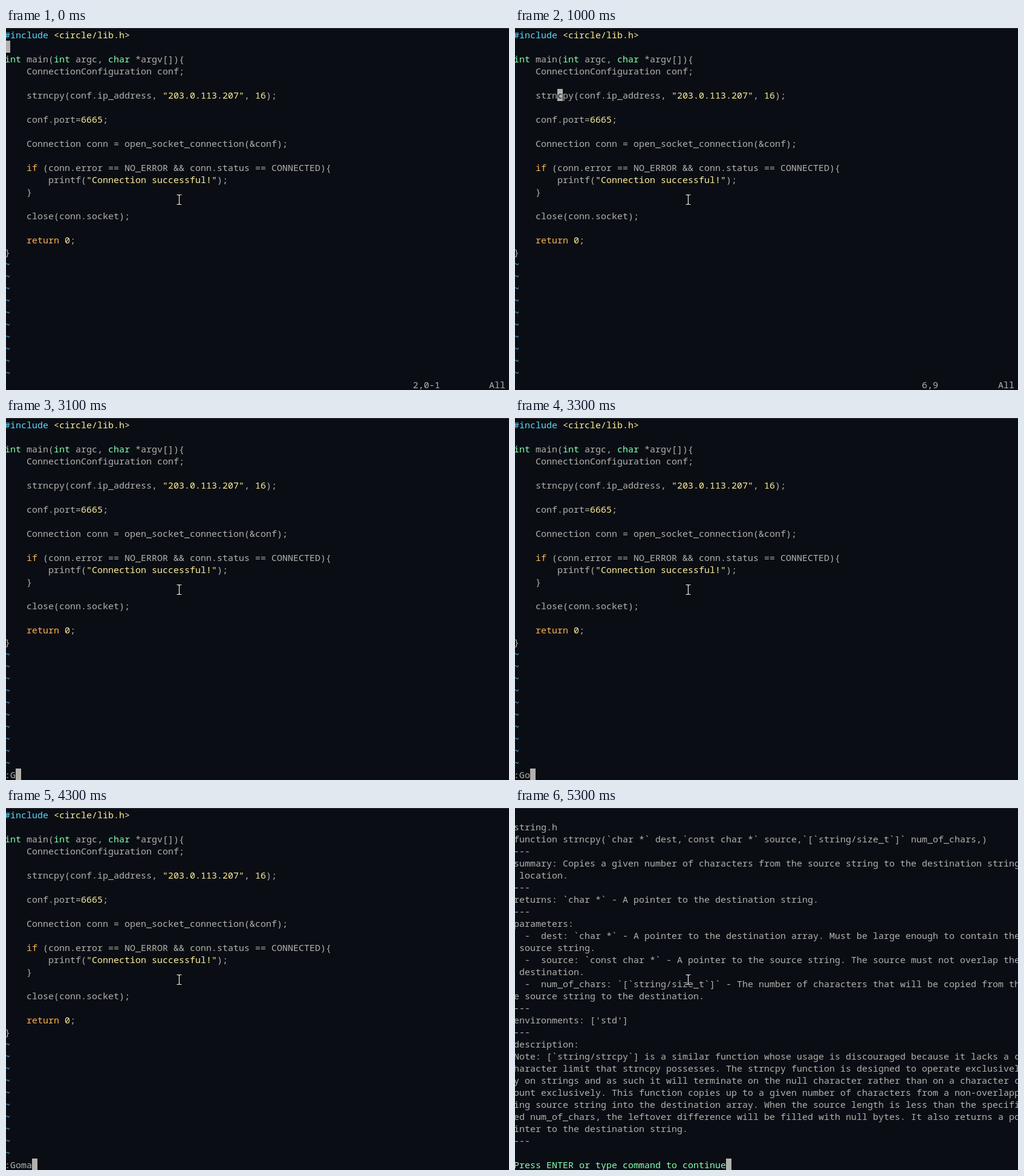
These frames come from a looping animation (832x600 px, 8 s). An HTML page:

```html
<!DOCTYPE html>
<html lang="en">
<head>
<meta charset="utf-8">
<title>Editor lookup</title>
<style>
  html, body { margin: 0; width: 100%; height: 100%; overflow: hidden; background: #0a0e14; }
  #stage { position: relative; width: 832px; height: 600px; overflow: hidden; background: #0a0e14; color: #b3b1ad; }
  #stage::before { content: ""; position: absolute; inset: 0 0 auto; height: 1px; background: #2d3136; }
  pre, #cursor {
    position: absolute; left: -2px; top: 1px; margin: 0;
    font: 15px/20px "Roboto Mono", "Noto Sans Mono", monospace;
    font-variant-ligatures: none; white-space: pre;
  }
  #cursor { width: 9px; height: 20px; background: #b3b1ad; color: #0a0e14; }
  #bottom { top: 581px; }
  #doc { visibility: hidden; }
  .pre { color: #5fd7ff; }
  .type { color: #87ffaf; }
  .lit { color: #ffee99; }
  .key { color: #ffb454; }
  .fill { color: #59c2ff; }
  #mouse { position: absolute; left: 280px; top: 274px; }

  #code { animation: code 8s step-end infinite; }
  #doc { animation: doc 8s step-end infinite; }
  @keyframes code { 0% { visibility: visible } 66.25%, 100% { visibility: hidden } }
  @keyframes doc { 0% { visibility: hidden } 66.25%, 100% { visibility: visible } }
</style>
</head>
<body>
<div id="stage">
<pre id="code"><span class="pre">#include </span><span class="lit">&lt;circle/lib.h&gt;</span>

<span class="type">int</span> main(<span class="type">int</span> argc, <span class="type">char</span> *argv[]){
    ConnectionConfiguration conf;

    strncpy(conf.ip_address, <span class="lit">"203.0.113.207"</span>, <span class="lit">16</span>);

    conf.port=<span class="lit">6665</span>;

    Connection conn = open_socket_connection(&amp;conf);

    <span class="key">if</span> (conn.error == NO_ERROR &amp;&amp; conn.status == CONNECTED){
        printf(<span class="lit">"Connection successful!"</span>);
    }

    close(conn.socket);

    <span class="key">return</span> <span class="lit">0</span>;
}
<span class="fill">~
~
~
~
~
~
~
~
~
~</span></pre>
<pre id="doc">

string.h
function strncpy(`char *` dest,`const char *` source,`[`string/size_t`]` num_of_chars,)
---
summary: Copies a given number of characters from the source string to the destination string
 location.
---
returns: `char *` - A pointer to the destination string.
---
parameters:
  -  dest: `char *` - A pointer to the destination array. Must be large enough to contain the
 source string.
  -  source: `const char *` - A pointer to the source string. The source must not overlap the
 destination.
  -  num_of_chars: `[`string/size_t`]` - The number of characters that will be copied from th
e source string to the destination.
---
environments: ['std']
---
description:
Note: [`string/strcpy`] is a similar function whose usage is discouraged because it lacks a c
haracter limit that strncpy possesses. The strncpy function is designed to operate exclusivel
y on strings and as such it will terminate on the null character rather than on a character c
ount exclusively. This function copies up to a given number of characters from a non-overlapp
ing source string into the destination array. When the source length is less than the specifi
ed num_of_chars, the leftover difference will be filled with null bytes. It also returns a po
inter to the destination string.
---</pre>
<pre id="bottom"></pre>
<div id="cursor"></div>
<svg id="mouse" width="14" height="21" viewBox="0 0 14 21" fill="none">
  <path id="beam" d="M2.5 2.5H5.5L6.5 3.5L7.5 2.5H10.5M6.5 3.5V17.5M2.5 18.5H5.5L6.5 17.5L7.5 18.5H10.5" stroke="#000" stroke-width="3"/>
  <use href="#beam" style="stroke:#fff"/>
  <path d="M2.5 2.5H5.5L6.5 3.5L7.5 2.5H10.5M6.5 3.5V17.5M2.5 18.5H5.5L6.5 17.5L7.5 18.5H10.5" stroke="#fff" stroke-width="1.2"/>
</svg>
</div>
<script>
const LOOP = 8000;
const COMMAND = ":GomavireSearch";
const PROMPT = "Press ENTER or type command to continue";
const cursor = document.getElementById("cursor");
const bottom = document.getElementById("bottom");

// Moving through the code: ruler text sits at column 75, "All" at 89
const move = (at, row, col, char, pos) =>
  ({ at, row, col, char, text: " ".repeat(75) + pos.padEnd(14) + "All" });

// Writing on the last row: the cursor follows the text
const write = (at, text, color = "") =>
  ({ at, row: 29, col: text.length, char: "", text, color });

const type = (at, count) => write(at, COMMAND.slice(0, count));

const steps = [
  move(0, 1, 0, "", "2,0-1"),
  move(400, 2, 8, "(", "3,9"),
  move(600, 3, 8, "e", "4,9"),
  move(700, 4, 0, "", "5,0-1"),
  move(1000, 5, 8, "c", "6,9"),
  type(1900, 1),
  type(3100, 2),
  type(3300, 3),
  type(4000, 4),
  type(4300, 5),
  type(4600, 6),
  type(4800, COMMAND.length),
  write(5300, PROMPT, "#87ffaf")
];

let shown;
function draw() {
  const time = performance.now() % LOOP;
  const step = steps.findLast(s => s.at <= time);
  if (step !== shown) {
    shown = step;
    cursor.style.left = step.col * 9 - 2 + "px";
    cursor.style.top = step.row * 20 + 1 + "px";
    cursor.textContent = step.char;
    bottom.textContent = step.text;
    bottom.style.color = step.color || "";
  }
  requestAnimationFrame(draw);
}
draw();
</script>
</body>
</html>
```
